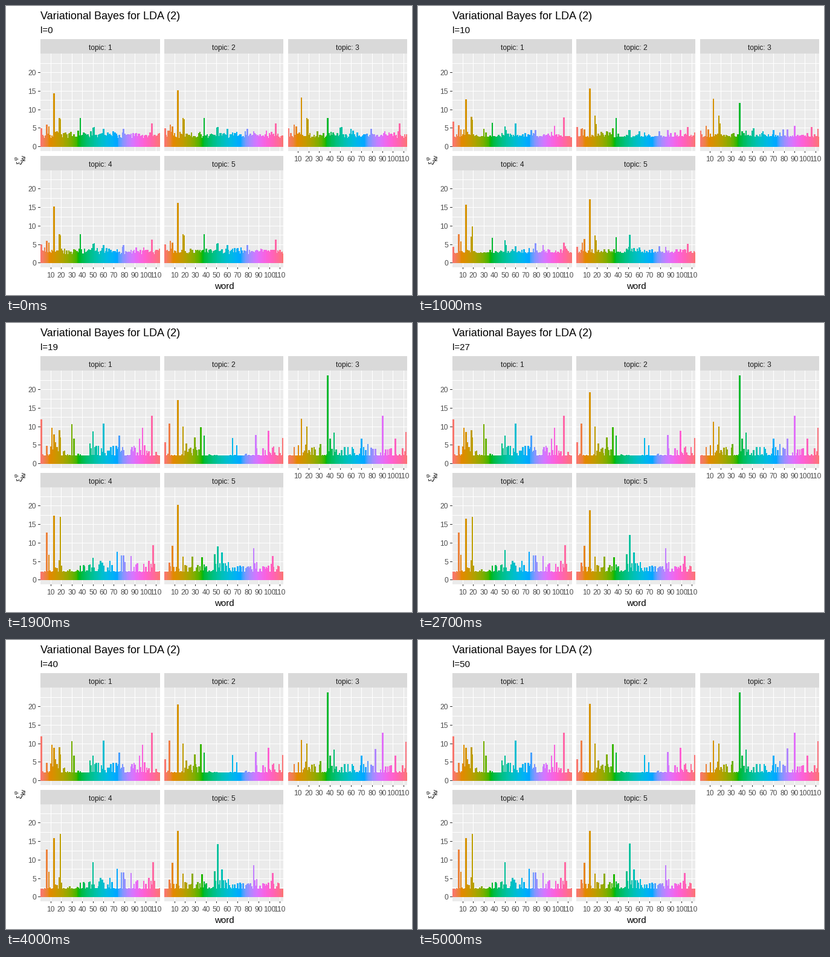
Animation of 672x480 px, one loop 5.1 s. Source, as a matplotlib script:

```python
import numpy as np
import matplotlib.pyplot as plt
from matplotlib.animation import FuncAnimation
from matplotlib.collections import PolyCollection
from matplotlib.patches import Rectangle

W, H, DPI = 672, 480, 96
STEPS, INTERVAL = 51, 100
WORDS = 113
LEFT, COL_PITCH, PANEL_W = 57.05, 204.8, 197.47
TOP, ROW_PITCH, PANEL_H, STRIP_H = 79.45, 193.06, 161.5, 24
PANELS = [(LEFT + COL_PITCH * (k % 3), TOP + ROW_PITCH * (k // 3)) for k in range(5)]
X_UNIT, Y_UNIT = PANEL_W / (WORDS + 0.2), 6.136
ZERO = 154.19
KEYS = [0, 6, 10, 19, 50]

# Frequent words, which start out high in every topic
START = {1: 5, 6: 6, 8: 5.5, 18: 7.8, 19: 7.4, 38: 7.8, 50: 5.1,
         51: 5.3, 60: 4.8, 79: 4.8, 106: 6.2}

# Word 13 per topic: first, at iteration 19, settled
TOP_WORD = 13
TOP_PATH = [(14.4, 7.9, 8.9), (15.2, 17.2, 20.7), (13.3, 12.1, 10.9),
            (15.2, 17.3, 15.9), (16.2, 20.2, 17.8)]

# Settled height of the words that come to mark each topic
SETTLED = [
    {1: 12, 6: 4.8, 11: 9.6, 14: 5.8, 18: 9, 19: 7, 30: 10.6, 32: 6.7, 50: 6.7,
     60: 10.9, 75: 7.5, 94: 6.7, 97: 9.7, 106: 13},
    {1: 5.8, 5: 10.8, 18: 10, 29: 7, 35: 9.9, 38: 7.5, 65: 6.9, 69: 5, 87: 7.8,
     99: 8.9, 113: 6.9},
    {18: 10, 38: 23.8, 40: 6.7, 44: 8.4, 70: 6.7, 83: 8.7, 90: 13, 102: 6.7,
     112: 10.6},
    {6: 12.7, 8: 6.8, 18: 5.2, 19: 17, 50: 9.4, 73: 7.5, 77: 6.6, 79: 6.6,
     86: 6.5, 107: 9.3},
    {8: 9.2, 18: 6.2, 27: 6.2, 36: 6.1, 48: 6.9, 51: 14.4, 55: 7.4, 85: 8.6,
     103: 6.5},
]

# (topic, word): height at iteration 19 where settling takes longer
SLOW = {(0, 50): 8.7, (2, 83): 4, (2, 112): 8.5, (3, 50): 6, (4, 51): 9}

# Word ranges holding each topic's minor words
BANDS = [[(9, 25), (44, 110)], [(20, 34), (88, 113)], [(6, 31), (39, 112)],
         [(14, 20), (37, 110)], [(4, 110)]]


def settled_row(rng, k):
    row = 2.1 + rng.exponential(0.13, WORDS)
    for first, last in BANDS[k]:
        band = np.arange(first - 1, last)
        minor = band[rng.random(len(band)) < 0.45]
        row[minor] = rng.triangular(2.6, 3.4, 5.7, len(minor))
    for word, h in SETTLED[k].items():
        row[word - 1] = h
    return row


def build_heights():
    """Bar heights indexed by [key, topic, word]."""
    rng = np.random.default_rng(12)
    out = np.zeros((len(KEYS), len(PANELS), WORDS))
    for k, (first, mid, last) in enumerate(TOP_PATH):
        late = settled_row(rng, k)
        start = np.clip(rng.normal(3.15, 0.45, WORDS), 2.3, 4.4)
        smooth = 2.7 + rng.exponential(0.3, WORDS)
        for word, h in START.items():
            start[word - 1] = smooth[word - 1] = h
        start[TOP_WORD - 1] = smooth[TOP_WORD - 1] = first
        late[TOP_WORD - 1] = mid
        out[:, k] = (start, smooth + 0.05 * (late - smooth),
                     smooth + 0.25 * (late - smooth), late, late)
        out[4, k, TOP_WORD - 1] = last
    for (k, word), h in SLOW.items():
        out[3, k, word - 1] = h
    return out


def heights_at(step):
    i = min(np.searchsorted(KEYS, step, side="right") - 1, len(KEYS) - 2)
    t = (step - KEYS[i]) / (KEYS[i + 1] - KEYS[i])
    if KEYS[i] == 10:
        t = t * t * (3 - 2 * t)
    elif KEYS[i] == 19:
        t = 1 - (1 - t) ** 3
    return HEIGHTS[i] * (1 - t) + HEIGHTS[i + 1] * t


def hcl(hue, chroma=100, lum=65):
    """Polar LUV colour, clipped to sRGB."""
    a = np.radians(hue)
    y = ((lum + 16) / 116) ** 3
    u = chroma * np.cos(a) / (13 * lum) + 0.1978398
    v = chroma * np.sin(a) / (13 * lum) + 0.4683363
    x = 9 * y * u / (4 * v)
    z = -x / 3 - 5 * y + 3 * y / v
    rgb = np.array([3.240479 * x - 1.537150 * y - 0.498535 * z,
                    -0.969256 * x + 1.875992 * y + 0.041556 * z,
                    0.055648 * x - 0.204043 * y + 1.057311 * z])
    rgb = np.clip(rgb, 0, 1)
    return np.where(rgb > 0.00304, 1.055 * rgb ** (1 / 2.4) - 0.055, 12.92 * rgb)


def box(x0, y0, x1, y1, color):
    ax.add_patch(Rectangle((x0, y0), x1 - x0, y1 - y0, fc=color, lw=0,
                           antialiased=False))


def label(x, y, text, size, color="black", ha="left", **kw):
    return ax.text(x, y, text, fontsize=size, color=color, ha=ha,
                   va="baseline", **kw)


def word_x(left, word):
    return left + (word - 0.4) * X_UNIT


def draw_panel(k, left, top):
    x0, x1 = round(left), round(left + PANEL_W)
    y0, y1 = round(top), round(top + PANEL_H)
    box(x0, round(top - STRIP_H), x1, y0, "#D9D9D9")
    label((x0 + x1) / 2, y0 - 6, f"topic: {k + 1}", 9, "#1A1A1A", "center")
    box(x0, y0, x1, y1, "#EBEBEB")
    for value in np.arange(0, 25, 2.5):
        y = int(top + ZERO - value * Y_UNIT)
        box(x0, y, x1, y + 1, "white")
        if x0 == 57 and value % 5 == 0:
            box(x0 - 4, y, x0, y + 1, "#333333")
            label(x0 - 7, y + 5, f"{value:.0f}", 9, "#4D4D4D", "right")
    for word in range(10, 111, 10):
        x = round(word_x(left, word))
        box(x, y0, x + 1, y1, "white")
        if k >= 2:
            box(x, y1, x + 1, y1 + 3, "#333333")
            label(x, y1 + 17, str(word), 9, "#4D4D4D", "center")


def bar_polys(step):
    polys = []
    for (left, top), row in zip(PANELS, heights_at(step)):
        base = int(top + ZERO) + 1
        edge = round(left + PANEL_W)
        for word, h in enumerate(row, 1):
            x = word_x(left, word)
            x0 = round(x - 0.45 * X_UNIT)
            x1 = min(round(x + 0.45 * X_UNIT) + 1, edge)
            y = round(base - 0.6 - h * Y_UNIT)
            polys.append([(x0, base), (x0, y), (x1, y), (x1, base)])
    return polys


plt.rcParams["font.family"] = "Liberation Sans"
fig = plt.figure(figsize=(W / DPI, H / DPI), dpi=DPI, facecolor="white")
ax = fig.add_axes([0, 0, 1, 1])
ax.set_xlim(0, W)
ax.set_ylim(H, 0)
ax.axis("off")

HEIGHTS = build_heights()
COLORS = [tuple(hcl(15 + 360 * i / WORDS)) for i in range(WORDS)]

for index, corner in enumerate(PANELS):
    draw_panel(index, *corner)
label(57, 22, "Variational Bayes for LDA (2)", 13.5)
subtitle = label(57, 45, "l=0", 11.25)
label(361, 470, "word", 11.25, ha="center")
upright = dict(rotation=90, rotation_mode="anchor")
label(26, 263, "ξ", 10, family="Liberation Serif", **upright)
label(20, 256, "φ", 7.5, family="Liberation Serif", **upright)
label(32, 257, "kv", 7.5, **upright)

bars = PolyCollection(bar_polys(0), facecolors=COLORS * len(PANELS),
                      edgecolors="none", linewidths=0, antialiaseds=False,
                      zorder=2)
ax.add_collection(bars, autolim=False)


def update(step):
    bars.set_verts(bar_polys(step))
    subtitle.set_text(f"l={step}")
    return bars, subtitle


anim = FuncAnimation(fig, update, frames=STEPS, interval=INTERVAL,
                     repeat=True, repeat_delay=0, blit=False)
plt.show()
```
